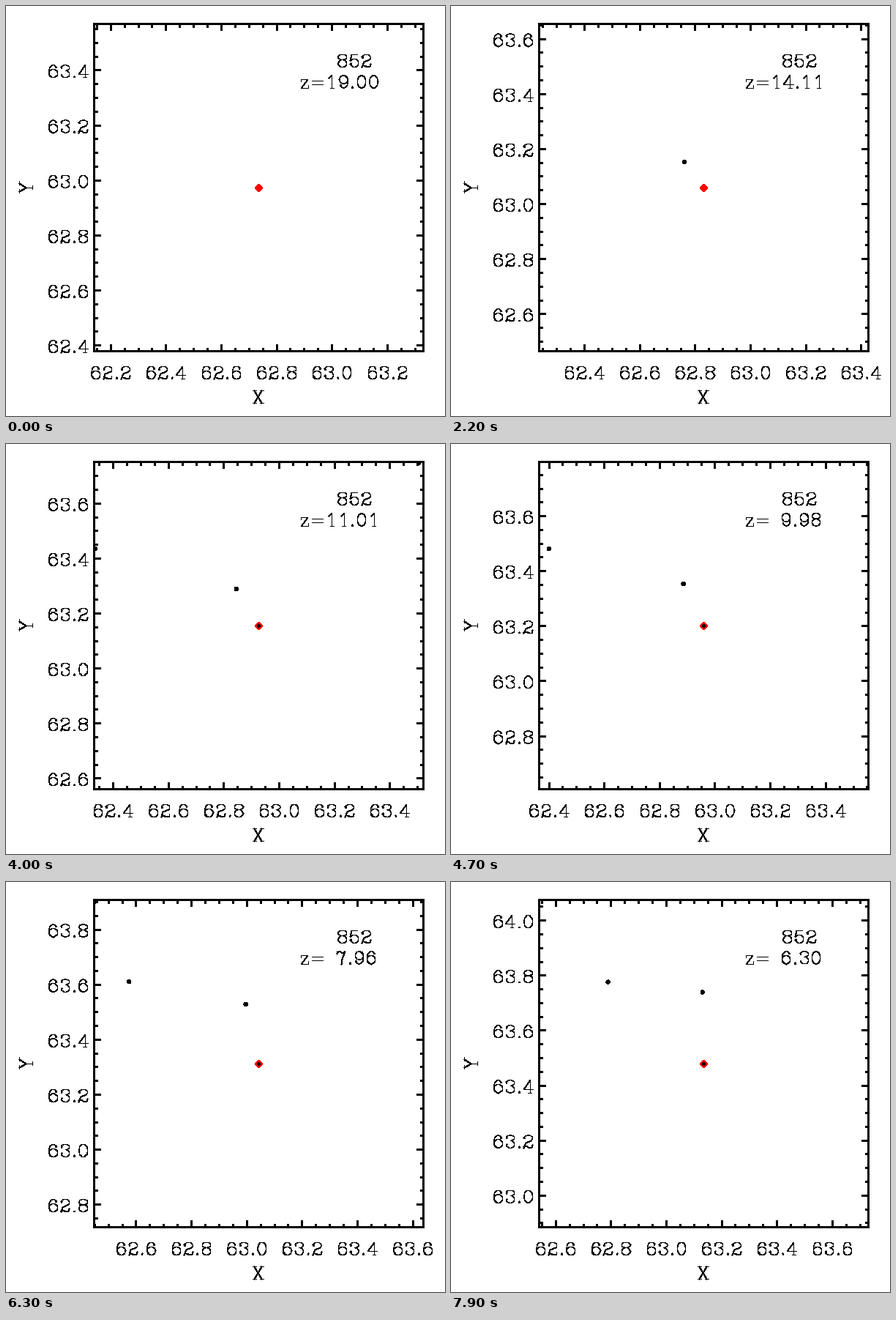
Write a matplotlib script that moves like this. It is 600 px wide and 560 px high and loops after 8 s.

```python
import numpy as np
import matplotlib.pyplot as plt
from matplotlib.animation import FuncAnimation
from matplotlib.collections import LineCollection
from matplotlib.patches import Circle, Rectangle, RegularPolygon

W, H, DPI = 600, 560, 100
FRAMES, INTERVAL = 80, 100
PX = 72 / DPI                        # one pixel in points
LO = np.array([120.5, 471.5])        # lower left corner of the plot box
HI = np.array([570.5, 24.5])         # upper right corner
CENTER = (LO + HI) / 2
SPAN = 1.19                          # data range on both axes
STEP = 0.05                          # minor ticks, every fourth is major
SCALE = 0.82                         # pixels per glyph unit


# --- stroke font: digits 20 wide, 21 high, y upwards from the baseline ---

def line(*p):
    return np.reshape(p, (-1, 2)).astype(float)


def bowl(bottom, top, start=0, end=360):
    """Part of an upright ellipse between two heights."""
    t = np.radians(np.linspace(start, end, 21))
    ry = (top - bottom) / 2
    return np.column_stack([10 + 7 * np.cos(t), bottom + ry + ry * np.sin(t)])


def bead(x, y):
    return line(x, y + 1, x - 1, y, x, y - 1, x + 1, y, x, y + 1)


def serif(x, y):
    return line(x - 3, y, x + 3, y)


SIX = [bowl(0, 14), bowl(0, 21, 45, 270), bead(15, 17)]
GLYPHS = {
    "0": [bowl(0, 21)],
    "1": [line(6, 17, 11, 21, 11, 0), serif(11, 0)],
    "2": [bead(4, 16), bowl(11, 21, 170, -45),
          line(15, 12, 6, 8, 3, 0), line(3, 2, 6, 3, 12, 0, 16, 1, 17, 5)],
    "3": [bead(4, 16), bead(4, 5), bowl(12, 21, 170, -90),
          bowl(0, 12, 90, -170)],
    "4": [line(13, 0, 13, 21, 2, 6, 18, 6), serif(13, 0)],
    "5": [bead(4, 5), line(15, 21, 5, 21, 3, 11), bowl(0, 14, 145, -165)],
    "6": SIX,
    "7": [line(3, 15, 3, 21), line(3, 18, 7, 21, 13, 18, 17, 21, 11, 8, 10, 0)],
    "8": [bowl(0, 12), bowl(12, 21)],
    "9": [[20, 21] - s for s in SIX],
    ".": [bead(5, 1)],
    "=": [line(4, y, 22, y) for y in (6, 12)],
    "z": [line(3, 10, 3, 14, 14, 14, 3, 0, 15, 0, 15, 4)],
    "X": [line(4, 21, 16, 0), line(16, 21, 4, 0)]
         + [serif(x, y) for x in (4, 16) for y in (0, 21)],
    "Y": [line(3, 21, 10, 10, 10, 0), line(17, 21, 10, 10),
          serif(4, 21), serif(17, 21), serif(10, 0)],
    " ": [],
}
WIDTHS = {".": 10, "=": 26, "z": 18, " ": 16}


def snap(p):
    return np.floor(p) + 0.5


def text(s, x, y, align=0.0, upright=False):
    """Strokes of s with its baseline at (x, y); align 0 left, 1 right."""
    pen = -align * sum(WIDTHS.get(c, 20) for c in s)
    out = []
    for c in s:
        for p in GLYPHS[c]:
            u, v = (p[:, 0] + pen) * SCALE, p[:, 1] * SCALE
            q = (x - v, y - u) if upright else (x + u, y - v)
            out.append(snap(np.column_stack(q)))
        pen += WIDTHS.get(c, 20)
    return out


# --- motion, in data units ---

KEYS = np.array([0, 9, 22, 40, 54, 63, 79])
MIDS = np.column_stack([
    [62.735, 62.776, 62.831, 62.926, 62.993, 63.043, 63.135],
    [62.974, 62.998, 63.060, 63.156, 63.251, 63.313, 63.480]])
SLOPES = np.gradient(MIDS, KEYS, axis=0)


def middle(n):
    """Centre of the view: cubic Hermite curve through the keys."""
    i = min(np.searchsorted(KEYS, n, "right"), len(KEYS) - 1) - 1
    d = KEYS[i + 1] - KEYS[i]
    t = (n - KEYS[i]) / d
    return ((1 + 2 * t) * (1 - t) ** 2 * MIDS[i]
            + t * (1 - t) ** 2 * d * SLOPES[i]
            + t * t * (3 - 2 * t) * MIDS[i + 1]
            + t * t * (t - 1) * d * SLOPES[i + 1])


class Body:
    """A dot in steady acceleration, seen from its birth while in the box."""

    def __init__(self, birth, start, speed, accel, t0):
        self.birth, self.t0 = birth, t0
        self.path = [np.array(v) for v in (start, speed, accel)]
        self.patch = dot(2.7, 3)

    def update(self, n, mid):
        start, speed, accel = self.path
        t = n - self.t0
        share = (start + speed * t + accel * t * t - mid) / SPAN
        self.patch.center = CENTER + share * (HI - LO)
        self.patch.set_visible(n >= self.birth and abs(share).max() < 0.5)


def redshift(n):
    return 20 * np.exp(-0.01275 * n) - 1


def ticks(mid):
    """Offset from the middle as a share of the span, and label if major."""
    first = int(np.ceil((mid - SPAN / 2) / STEP))
    last = int(np.floor((mid + SPAN / 2) / STEP))
    for k in range(first, last + 1):
        yield (k * STEP - mid) / SPAN, "" if k % 4 else f"{k * STEP:.1f}"


# --- figure ---

fig = plt.figure(figsize=(W / DPI, H / DPI), dpi=DPI, facecolor="white")
ax = fig.add_axes([0, 0, 1, 1])
ax.set(xlim=(0, W), ylim=(H, 0))
ax.axis("off")


def strokes(width, cap):
    return ax.add_collection(LineCollection(
        [], colors="black", linewidths=width * PX, antialiaseds=False,
        capstyle=cap, joinstyle="round", snap=False))


def dot(r, z):
    return ax.add_patch(Circle(CENTER, r, fc="black", lw=0, aa=False, zorder=z))


thin, thick = strokes(1, "projecting"), strokes(3, "butt")
ax.add_patch(Rectangle(LO, *(HI - LO), fill=False, ec="black", lw=3 * PX,
                       aa=False, joinstyle="miter", snap=False))
ax.add_patch(RegularPolygon(CENTER + [0, 0.5], 4, radius=5.2, fc="red", lw=0,
                            aa=False, zorder=4))
core = dot(1.8, 5)
core.center = CENTER + [0, 0.5]
CORE_BIRTH = 31

bodies = [
    Body(16, (62.761, 63.153), (0.0038, 0.0063), (4.7e-5, 7e-5), 22),
    Body(40, (62.335, 63.436), (0.0086, 0.0060), (7.8e-5, 7e-5), 40),
    Body(40, (63.504, 63.747), (0.0100, 0.0090), (7e-5, 7e-5), 40),
]

STATIC = (text("852", 451.5, 83.5) + text("X", 344.8, 542.5, 0.5)
          + text("Y", 36, CENTER[1], 0.5, upright=True))


def draw(n):
    mid = middle(n)
    glyphs = STATIC + text(f"z={redshift(n):5.2f}", 400.8, 112)
    marks = []
    for axis in (0, 1):
        for share, label in ticks(mid[axis]):
            at = CENTER[axis] + share * (HI - LO)[axis]
            size = 9 if label else 4.5
            for edge, inward in ((LO, 1), (HI, -1)):
                base = edge[1 - axis]
                tip = base + inward * size * (1 if axis else -1)
                mark = snap(line(at, base, at, tip))
                marks.append(mark[:, ::-1] if axis else mark)
            glyphs += (text(label, 113.8, at + 10, 1) if axis
                       else text(label, at, 509.5, 0.5))

    thin.set_segments(glyphs)
    thick.set_segments(marks)
    for body in bodies:
        body.update(n, mid)
    core.set_visible(n >= CORE_BIRTH)
    return [thin, thick, core]


anim = FuncAnimation(fig, draw, frames=FRAMES, interval=INTERVAL,
                     repeat=True, repeat_delay=0, blit=False)
plt.show()
```
